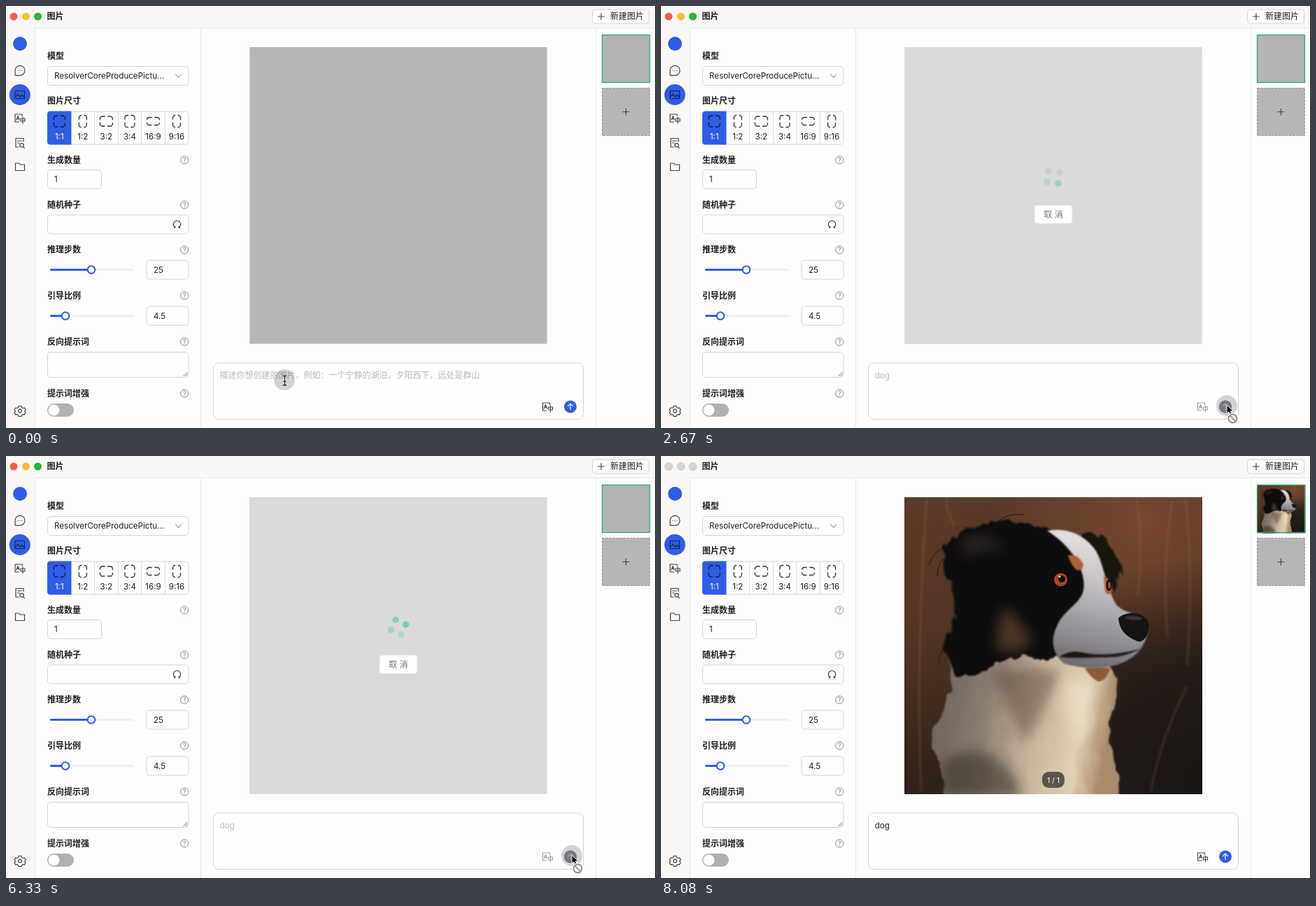
Recreate the animation shown at these times as an HTML page. Size 928 px wide and 604 px high, loop 8160 ms.

```html
<!DOCTYPE html>
<html lang="zh-CN">
<head>
<meta charset="utf-8">
<title>图片</title>
<style>
@property --veil { syntax: "<number>"; inherits: true; initial-value: 0; }
@property --off { syntax: "<number>"; inherits: true; initial-value: 0; }
html, body { margin: 0; width: 100%; height: 100%; overflow: hidden; background: #fdfdfe; }
svg.stage {
  display: block; width: 100vw; height: 100vh;
  animation: veil 8160ms linear infinite, off 8160ms linear infinite;
}
text { font: 12px Inter, "Noto Sans CJK SC", sans-serif; fill: #1f1f21; }
.lat { font-size: 11.6px; }
.bold { font-weight: 600; }
.mid { text-anchor: middle; }
.box { fill: #fefeff; stroke: #d3d3d6; }
.icon { fill: none; stroke: #444; stroke-width: 1.2; stroke-linecap: round; stroke-linejoin: round; }
.blue { fill: #2f5de6; }
.hint { fill: #b9b9bc; }

/* hard switches share one clock */
.hint, .key, .caret, .wait, .done, .lamp, .cursor, .beam, .hand, .arrow {
  animation: 8160ms step-end infinite;
}
.hint { animation-name: hint; }
.k1 { animation-name: key1; }
.k2 { animation-name: key2; }
.k3 { animation-name: key3; }
.caret { animation-name: caret; }
.wait { animation-name: wait; }
.done { animation-name: done; }
.lamp { animation-name: lamp; }
.cursor { animation-name: cursor; }
.beam { animation-name: beam; }
.hand { animation-name: hand; }
.arrow { animation-name: arrow; }

.veil { opacity: calc(var(--veil) * .5); }
.fade { opacity: calc(1 - var(--off) * .7); }
.dim { opacity: calc(1 - var(--off) * .5); }
.grey { opacity: var(--off); }

.spin { animation: spin 8160ms linear infinite; }
.spin circle { fill: #00b96b; animation: pulse 8160ms linear infinite backwards; }
.spin circle:nth-child(2) { animation-delay: .4s; }
.spin circle:nth-child(3) { animation-delay: .8s; }
.spin circle:nth-child(4) { animation-delay: 1.2s; }

@keyframes veil {
  0%, 27.56% { --veil: 0; }
  27.57% { --veil: .3; }
  28.55% { --veil: .8; }
  30.6%, 83.69% { --veil: 1; }
  83.7% { --veil: .85; }
  84.8% { --veil: .45; }
  87.4%, 100% { --veil: 0; }
}
@keyframes off {
  0%, 27.56% { --off: 0; }
  27.57% { --off: .2; }
  28.55% { --off: .6; }
  30.6%, 83.69% { --off: 1; }
  83.7% { --off: .9; }
  84.8% { --off: .58; }
  87.4%, 100% { --off: 0; }
}
@keyframes hint { 0% { opacity: 1; } 5.14%, 100% { opacity: 0; } }
@keyframes key1 { 0% { fill-opacity: 0; } 5.14%, 100% { fill-opacity: 1; } }
@keyframes key2 { 0% { fill-opacity: 0; } 6.12%, 100% { fill-opacity: 1; } }
@keyframes key3 { 0% { fill-opacity: 0; } 9.19%, 100% { fill-opacity: 1; } }
@keyframes caret {
  0% { opacity: 0; transform: translateX(0); }
  .98% { opacity: 1; transform: translateX(0); }
  5.14% { opacity: 1; transform: translateX(7.5px); }
  6.12% { opacity: 1; transform: translateX(14.5px); }
  9.19% { opacity: 1; transform: translateX(21.5px); }
  15.31% { opacity: 0; transform: translateX(21.5px); }
  21.44% { opacity: 1; transform: translateX(21.5px); }
  27.57%, 100% { opacity: 0; transform: translateX(21.5px); }
}
@keyframes wait { 0% { opacity: 0; } 27.57% { opacity: 1; } 83.7%, 100% { opacity: 0; } }
@keyframes done { 0% { opacity: 0; } 83.7%, 100% { opacity: 1; } }
@keyframes lamp { 0% { opacity: 0; } 99.01%, 100% { opacity: 1; } }
@keyframes beam { 0% { opacity: 1; } 18.38%, 100% { opacity: 0; } }
@keyframes hand {
  0% { opacity: 0; } 18.38% { opacity: 1; } 27.57% { opacity: 0; }
  83.7% { opacity: 1; } 91.91%, 100% { opacity: 0; }
}
@keyframes arrow {
  0% { opacity: 0; } 27.57% { opacity: 1; } 83.7% { opacity: 0; } 91.91%, 100% { opacity: 1; }
}
@keyframes cursor {
  0% { transform: translate(398px, 535px); }
  13.23% { transform: translate(437px, 537px); }
  14.33% { transform: translate(565px, 541px); }
  15.31% { transform: translate(666px, 545px); }
  17.4% { transform: translate(770px, 553px); }
  18.38% { transform: translate(811px, 558px); }
  21.44% { transform: translate(814px, 561px); }
  23.52% { transform: translate(817px, 567px); }
  25.49% { transform: translate(809px, 572px); }
  89.82% { transform: translate(811px, 574px); }
  90.93% { transform: translate(816px, 579px); }
  91.91% { transform: translate(824px, 585px); }
  92.89% { transform: translate(836px, 592px); }
  93.99% { transform: translate(851px, 600px); }
  94.97% { transform: translate(869px, 608px); }
  95.95%, 100% { transform: translate(880px, 700px); }
}
@keyframes spin { from { transform: rotate(-614.4deg); } to { transform: rotate(1833.6deg); } }
@keyframes pulse {
  0%, 26.94%, 51.45%, 75.96%, 100% { opacity: .3; }
  39.19%, 63.7%, 88.21% { opacity: 1; }
}
</style>
</head>
<body>
<svg class="stage" viewBox="0 0 928 604" xmlns="http://www.w3.org/2000/svg">
  <defs>
    <linearGradient id="field" x2=".3" y2="1">
      <stop offset="0" stop-color="#5c3b2a"/><stop offset=".45" stop-color="#503424"/><stop offset="1" stop-color="#291e18"/>
    </linearGradient>
    <radialGradient id="dusk" cx="1" cy=".95" r=".75">
      <stop offset="0" stop-color="#181514"/><stop offset=".5" stop-color="#1f1917" stop-opacity=".75"/><stop offset="1" stop-color="#2a1e18" stop-opacity="0"/>
    </radialGradient>
    <radialGradient id="glow" cx=".8" cy=".08" r=".5">
      <stop offset="0" stop-color="#784833"/><stop offset="1" stop-color="#784833" stop-opacity="0"/>
    </radialGradient>
    <linearGradient id="coat" y2=".15">
      <stop offset="0" stop-color="#665c55"/><stop offset=".35" stop-color="#8d8175"/><stop offset=".62" stop-color="#c9b79f"/><stop offset=".85" stop-color="#e0d0b6"/><stop offset="1" stop-color="#a88b6c"/>
    </linearGradient>
    <linearGradient id="face" x1=".55" y1="0" x2=".4" y2="1">
      <stop offset="0" stop-color="#ece6e3"/><stop offset=".4" stop-color="#c4c1c5"/><stop offset=".7" stop-color="#9a989f"/><stop offset="1" stop-color="#6f6a6e"/>
    </linearGradient>
    <filter id="soft"><feGaussianBlur stdDeviation="1.3"/></filter>
    <filter id="haze" x="-50%" y="-50%" width="200%" height="200%"><feGaussianBlur stdDeviation="9"/></filter>
    <filter id="fur">
      <feTurbulence type="fractalNoise" baseFrequency=".07 .035" numOctaves="2" seed="4"/>
      <feDisplacementMap in="SourceGraphic" scale="18" xChannelSelector="R" yChannelSelector="G"/>
      <feGaussianBlur stdDeviation="1.2"/>
    </filter>
    <clipPath id="photo"><rect x="348.5" y="59" width="425" height="424.5"/></clipPath>

    <g id="lang" class="icon">
      <path d="M-1 5H-6.5V-6H3.5V-3.5M-4.5 2l2-5.5 2 5.5M-3.8 .4h2.7M1.5 0H7.5V4H1.5ZM4.5-2V7"/>
    </g>

    <g id="dog" clip-path="url(#photo)">
      <rect x="348" y="58" width="426" height="426" fill="url(#field)"/>
      <rect x="348" y="58" width="426" height="426" fill="url(#glow)"/>
      <rect x="348" y="58" width="426" height="426" fill="url(#dusk)"/>
      <g fill="none" filter="url(#soft)" stroke="#a87650" stroke-width="4" opacity=".16">
        <path d="M372 480Q364 280 380 60M420 100Q404 70 410 58M682 200Q690 130 680 60M724 260Q716 150 732 60M700 480Q716 400 752 330M752 300Q762 180 750 60"/>
      </g>
      <path filter="url(#fur)" fill="#181310" d="M600 112C620 102 640 118 650 140C659 160 657 184 648 198L620 174Z"/>
      <path filter="url(#fur)" fill="url(#coat)" d="M410 290C420 328 408 352 401 372C382 398 387 420 400 440L404 500H653C664 452 640 420 640 384C650 352 662 326 646 304L560 270Z"/>
      <g filter="url(#haze)">
        <path fill="#322822" opacity=".55" d="M400 440Q450 400 500 450L520 490H400Z"/>
        <path fill="#5a4636" opacity=".5" d="M470 305Q540 300 570 310Q548 370 520 410Q496 360 470 305Z"/>
        <path fill="#f2e6d2" opacity=".55" d="M575 325Q600 318 620 330Q620 370 600 410Q580 380 575 325Z"/>
      </g>
      <path filter="url(#fur)" fill="#0f0d0d" d="M562 106C528 92 480 87 446 103C420 110 400 128 405 146C398 156 410 166 414 182C420 204 424 220 416 246C404 270 408 300 424 315C448 320 470 302 494 290C520 285 548 291 572 288L606 226L610 150Z"/>
      <path filter="url(#haze)" fill="#604331" opacity=".75" d="M488 222C505 216 512 240 530 262C522 284 492 284 478 272Z"/>
      <path filter="url(#haze)" fill="#3d2f29" opacity=".6" d="M428 118Q470 104 494 134Q460 130 436 146Z"/>
      <path class="icon" style="stroke:#1a1512;stroke-width:.9" d="M412 128Q390 134 383 156M410 142Q394 154 395 172M478 96Q498 80 518 84M408 270Q396 282 397 300"/>
      <path filter="url(#soft)" fill="#8e583b" d="M606 303Q626 300 642 304Q638 320 626 323Q614 318 606 303Z"/>
      <path filter="url(#soft)" fill="url(#face)" d="M552 107C580 102 606 112 622 136C634 156 636 190 652 214C664 226 690 226 697 246C694 268 684 284 664 294C640 306 606 306 576 297C560 284 556 262 566 244C574 222 596 214 603 196C611 170 590 130 552 107Z"/>
      <path filter="url(#soft)" fill="#a96039" d="M582 142Q598 140 604 156Q602 166 594 163Q586 156 582 142ZM633 172Q645 176 645 194Q640 202 635 194Z"/>
      <circle cx="571.5" cy="177" r="12" fill="#0d0908"/>
      <circle cx="571.5" cy="177" r="9.5" fill="#a04a25"/>
      <circle cx="573" cy="176" r="5" fill="#130b08"/>
      <circle cx="570" cy="172.5" r="1.6" fill="#eee"/>
      <ellipse cx="640.5" cy="185" rx="4" ry="8" fill="#140c09"/>
      <ellipse cx="641" cy="185" rx="2" ry="5" fill="#9b4a27"/>
      <path fill="#161314" d="M654 232C664 222 690 222 697 238C700 250 694 264 684 266C674 262 656 256 654 232Z"/>
      <path fill="#4b4648" opacity=".7" filter="url(#soft)" d="M662 231Q676 225 690 233Q676 238 662 231Z"/>
      <path fill="#1b1515" filter="url(#soft)" d="M570 288Q584 276 606 282Q640 288 686 276Q660 290 630 288Q596 290 570 288Z"/>
    </g>
  </defs>

  <rect width="928" height="604" fill="#f9f8f6"/>
  <path d="M42 604V36Q42 32 46 32H928V604Z" fill="#fdfdfe"/>
  <path d="M41.5 604V31.5H928M278.5 32V604M843.5 32V604" fill="none" stroke="#e8e7e6"/>

  <!-- title bar -->
  <circle cx="11" cy="15" r="5.5" fill="#fe5850"/>
  <circle cx="28.5" cy="15" r="5.5" fill="#febc2e"/>
  <circle cx="45.5" cy="15" r="5.5" fill="#27b63f"/>
  <g class="lamp" fill="#d5d4d2" stroke="#c8c7c5" stroke-width=".6">
    <circle cx="11" cy="15" r="5.5"/><circle cx="28.5" cy="15" r="5.5"/><circle cx="45.5" cy="15" r="5.5"/>
  </g>
  <text class="bold" x="58.5" y="19.3">图片</text>
  <rect class="box" x="838.5" y="5" width="81" height="20" rx="4"/>
  <path class="icon" d="M846.5 15h9M851 10.5v9"/>
  <text x="864" y="19.3">新建图片</text>

  <!-- side bar -->
  <circle class="blue" cx="20" cy="54" r="10"/>
  <g class="icon">
    <path d="M13 98.5V92A7 7 0 1 1 20 99.3H13.5M17 92.3h.1M20 92.3h.1M23 92.3h.1"/>
    <circle class="blue" cx="19.8" cy="127" r="15" stroke="none"/>
    <path stroke="#16234f" d="M13 121.5H26.5V132.5H13ZM13 130.5l4-4 3.5 3.5 2.5-2.5 3.5 3.5M16.5 124.8h.1"/>
    <use href="#lang" x="19.5" y="161"/>
    <path d="M18 202H14V189.5H25V194M16.5 193h6M16.5 196h2.5M24.3 201.3l2 2"/>
    <circle cx="22.5" cy="199.3" r="2.7"/>
    <path d="M13.5 235.500V225H18.5L20 227H26.5V235.5Z"/>
    <circle cx="20" cy="579.5" r="2.3"/>
    <path d="M18 572.5h4l.7 2.2 1.6.9 2.2-.5 1.8 3.1-1.5 1.5 0 1 1.2 1.4-1.8 3-2-.5-1.5.9-.7 1.9h-4l-.7-1.9-1.5-.9-2 .5-1.8-3 1.3-1.4v-1.2l-1.3-1.4 1.8-3.1 2.1.5 1.5-.8Z"/>
  </g>

  <!-- settings -->
  <g id="labels"></g>
  <rect class="box" x="59.5" y="86.5" width="201.5" height="27" rx="4.5"/>
  <text class="lat" x="69" y="104.4">ResolverCoreProducePictu...</text>
  <path class="icon" style="stroke:#aaa" d="M242.5 97.8l4.2 4.7 4.2-4.7"/>
  <rect class="box" x="59.5" y="151" width="201.5" height="47" rx="4.5"/>
  <path class="blue" d="M63.5 150.5H93.5V198.5H63.5Q59 198.5 59 194V155Q59 150.5 63.5 150.5Z"/>
  <path d="M126.5 151V198M160.5 151V198M193.5 151V198M227.5 151V198" stroke="#dcdcde"/>
  <g id="ratios"></g>
  <rect class="box" x="59.5" y="234.5" width="77" height="27" rx="4.5"/>
  <text class="lat" x="69" y="252.3">1</text>
  <rect class="box" x="59.5" y="299" width="201.5" height="27" rx="4.5"/>
  <path class="icon" d="M242 317A5.2 5.2 0 1 1 247 317M247.2 315.6v1.7h1.6M241.8 315.6v1.7h-1.2"/>
  <rect class="box" x="201" y="364" width="60" height="27" rx="4.5"/>
  <text class="lat" x="211" y="382">25</text>
  <rect class="box" x="201" y="430" width="60" height="27" rx="4.5"/>
  <text class="lat" x="211" y="448">4.5</text>
  <g stroke-width="3.2" stroke-linecap="round" stroke="#f0f0f1">
    <path d="M64.5 377.5H181.5M64.5 443.5H181.5"/>
    <path stroke="#2f5de6" d="M64.5 377.5H122M64.5 443.5H85"/>
  </g>
  <g fill="#fff" stroke="#2f5de6" stroke-width="2">
    <circle cx="122" cy="377.5" r="5.3"/><circle cx="85" cy="443.5" r="5.3"/>
  </g>
  <rect class="box" x="59.5" y="495.5" width="201.5" height="36" rx="4.5"/>
  <path d="M253.5 530l6-6M257 530l2.5-2.5" stroke="#666"/>
  <rect x="59" y="569" width="38" height="18.8" rx="9.4" fill="#b0b0b0"/>
  <circle cx="68.5" cy="578.4" r="8" fill="#fff"/>

  <!-- picture -->
  <rect x="348.5" y="59" width="425" height="424.5" fill="#b6b6b6"/>
  <g class="done">
    <use href="#dog"/>
    <rect x="545" y="452" width="32" height="23" rx="9.5" fill="#2d2a28" fill-opacity=".72"/>
    <text class="mid" x="561" y="467.5" style="font-size:10.5px;fill:#fff">1 / 1</text>
  </g>
  <rect class="veil" x="348.5" y="59" width="425" height="424.5" fill="#fdfdfe"/>
  <g class="wait">
    <g transform="translate(561 245)" opacity=".47">
      <g class="spin">
        <circle cx="-8" cy="-8" r="4.7"/><circle cx="8" cy="-8" r="4.7"/>
        <circle cx="8" cy="8" r="4.7"/><circle cx="-8" cy="8" r="4.7"/>
      </g>
    </g>
    <rect x="534" y="285" width="54" height="26.5" rx="4" fill="#fefefe" stroke="#e3e3e4"/>
    <text class="mid" x="561" y="302.6" style="fill:#777">取 消</text>
  </g>

  <!-- thumbnails -->
  <rect x="852" y="41" width="69" height="69" fill="#b4b4b5"/>
  <g class="done"><use href="#dog" transform="translate(795.3 31.4) scale(.1628)"/></g>
  <rect x="852.5" y="41.5" width="68" height="68" fill="none" stroke="#2bab6c" stroke-width="1.3"/>
  <rect x="852.5" y="117.5" width="68" height="68" fill="#b6b6b6" stroke="#8f8f8f" stroke-dasharray="3 2"/>
  <path class="icon" d="M882 151.5h9M886.5 147v9"/>

  <!-- prompt -->
  <rect class="box" x="296.5" y="511" width="529" height="80.5" rx="8"/>
  <text class="hint" x="305.5" y="533.3">描述你想创建的图片，例如：一个宁静的湖泊，夕阳西下，远处是群山</text>
  <text class="lat fade" x="305.7" y="533.3"><tspan class="key k1">d</tspan><tspan class="key k2">o</tspan><tspan class="key k3">g</tspan></text>
  <rect class="caret" x="305.5" y="522" width="1" height="14" fill="#222"/>
  <use class="dim" href="#lang" x="774" y="574"/>
  <circle class="blue" cx="807" cy="573.5" r="9"/>
  <circle class="grey" cx="807" cy="573.5" r="9" fill="#8c8c8c"/>
  <path class="icon dim" style="stroke:#fff" d="M807 577.5v-8M803.7 572.5l3.3-3.3 3.3 3.3"/>

  <!-- pointer -->
  <g class="cursor">
    <circle r="15" fill="#33333f" fill-opacity=".21"/>
    <g class="beam">
      <path class="icon" style="stroke:#fff;stroke-width:2.6" d="M.5-5V7"/>
      <path class="icon" style="stroke:#111" d="M-2-6Q.5-6 .5-4Q.5-6 3-6M.5-4.5V6.5M-2 8Q.5 8 .5 6Q.5 8 3 8M-1 2.5H2"/>
    </g>
    <path class="hand" fill="#fff" stroke="#111" stroke-width="1.1" stroke-linejoin="round" d="M-.5 2.5Q.5 .8 2 2.5L3.5 7Q4.5 5.8 5.8 7Q7 6.2 7.8 7.7Q9.2 7.2 9.2 9V12L7.8 15.5H1.5L-2.5 10.5Q-3.5 8.5-1.5 8.7L.7 10Z"/>
    <path class="arrow" fill="#0c0c0c" stroke="#fff" d="M0-1V11.5L3 8.8L5.2 13.5L7.4 12.5L5.3 8H9.3Z"/>
    <g class="wait" fill="none" stroke="#fff" stroke-width="4">
      <path d="M3.8 13.8l9.4 9.4"/><circle cx="8.5" cy="18.5" r="6"/>
      <g stroke="#8b8b8b" stroke-width="1.8"><path d="M4.2 14.2l8.6 8.6"/><circle cx="8.5" cy="18.5" r="6"/></g>
    </g>
  </g>
</svg>
<script>
const put = (id, html) => { document.getElementById(id).innerHTML = html; };

const labels = [["模型", 72], ["图片尺寸", 136], ["生成数量", 220.5], ["随机种子", 284.5],
  ["推理步数", 349], ["引导比例", 414.5], ["反向提示词", 480.5], ["提示词增强", 554.5]];
const help = y => `<circle cx="255.2" cy="${y}" r="5.6" fill="none" stroke="#8a8a8c"/>
  <text class="mid" x="255.2" y="${y + 3.2}" style="font-size:9px;fill:#777">?</text>`;
put("labels", labels.map(([name, y]) =>
  `<text class="bold" x="59" y="${y + 4.4}">${name}</text>` + (y > 200 ? help(y) : "")).join(""));

// rounded frame with a gap in the middle of each side
const frame = (x, y, w, h, color) => {
  const r = 3.5, gap = 3.6, arm = s => (s - 2 * r - gap) / 2, bend = Math.PI * r / 2;
  const a = arm(w), b = arm(h), turn = a + bend + b;
  const dash = [a, gap, turn, gap, turn, gap, turn, gap, b + bend + 1, 0];
  return `<rect x="${x - w / 2}" y="${y - h / 2}" width="${w}" height="${h}" rx="${r}" fill="none"
    stroke="${color}" stroke-width="1.3" stroke-dasharray="${dash}"/>`;
};
const ratios = [["1:1", 16, 16], ["1:2", 11, 17], ["3:2", 18, 14], ["3:4", 14, 17], ["16:9", 18, 11], ["9:16", 11, 17]];
put("ratios", ratios.map(([name, w, h], i) => {
  const x = 76.3 + i * 33.55;
  return frame(x, 165, w, h, i ? "#333" : "#101c48") +
    `<text class="lat mid" x="${x}" y="190.6" style="fill:${i ? "#1f1f21" : "#fff"}">${name}</text>`;
}).join(""));
</script>
</body>
</html>
```
